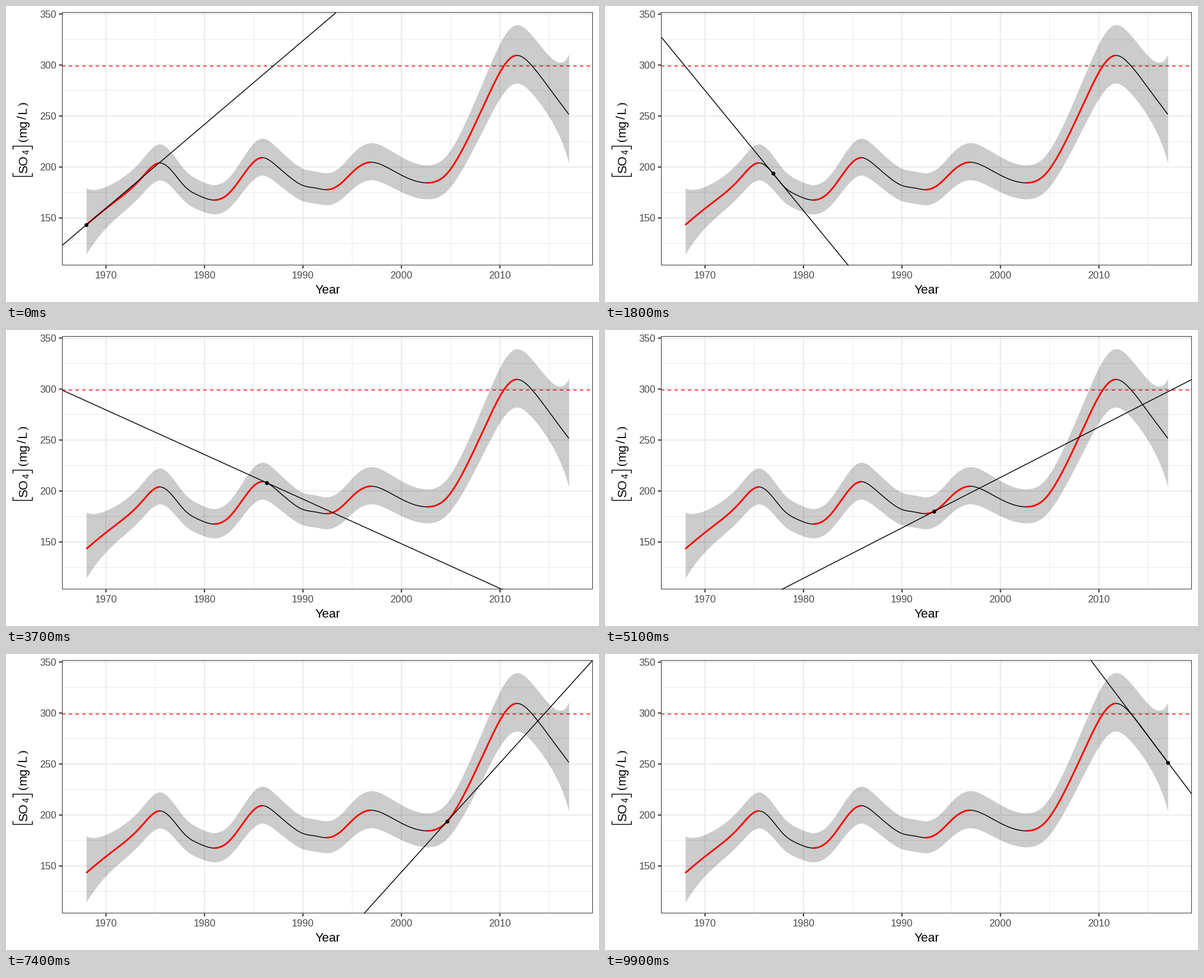
Recreate the animation shown at these times as a matplotlib script. Size 1058 by 529 pixels, loop 10 s.

```python
import numpy as np
import matplotlib.pyplot as plt
from matplotlib.animation import FuncAnimation

W, H, DPI = 1058, 529, 100
PX = 72 / DPI
LEFT, RIGHT, TOP, BOTTOM = 100, 1047, 11, 463.5
FIRST, LAST = 1968, 2017
FRAMES = 100
THIN, THICK, MAJOR, MINOR = 1.5, 3, 2.1, 1.07
SANS, SERIF = "Liberation Sans", "Liberation Serif"
GRID, INK, TICK = "#EBEBEB", "#4D4D4D", "#333333"

# Turning points and bends of the trend: year, concentration
KEYS = [
    (1968, 143.3), (1970, 159.3), (1972.5, 178.5), (1973.5, 188.1),
    (1975.5, 204), (1976.9, 193.7), (1978.07, 180.3), (1979.5, 171.7),
    (1981.03, 167.6), (1982.5, 174.4), (1984.2, 195.8), (1985.75, 209.1),
    (1987.2, 202.1), (1988.6, 190.6), (1990, 181.9), (1991.3, 179.4),
    (1992.5, 177.8), (1993.8, 183.5), (1995.1, 195.7), (1996.75, 204.6),
    (1998.3, 200.8), (2000, 192), (2002.55, 184.5), (2004.5, 192.3),
    (2005.95, 212.8), (2007.03, 233.1), (2009.06, 275), (2010.2, 296.2),
    (2011.53, 309.2), (2013.2, 299.9), (2015.05, 276.8), (2017, 251.6)]


def year_px(year):
    return 143.3 + (year - FIRST) * 17.57


def conc_px(value):
    return 14.4 + (350 - value) * 1.8225


class Spline:
    """Natural cubic spline through a few points."""

    def __init__(self, points):
        self.x, self.y = np.array(points, float).T
        n, h = len(points), np.diff(self.x)
        d = np.diff(self.y) / h
        a, b = np.eye(n), np.zeros(n)
        for i in range(1, n - 1):
            a[i, i - 1:i + 2] = h[i - 1], 2 * (h[i - 1] + h[i]), h[i]
            b[i] = 6 * (d[i] - d[i - 1])
        self.m, self.h, self.d = np.linalg.solve(a, b), h, d

    def __call__(self, t, slope=False):
        i = np.clip(np.searchsorted(self.x, t) - 1, 0, len(self.h) - 1)
        h, m0, m1 = self.h[i], self.m[i], self.m[i + 1]
        s = t - self.x[i]
        c1 = self.d[i] - h * (2 * m0 + m1) / 6
        c3 = (m1 - m0) / (6 * h)
        if slope:
            return c1 + m0 * s + 3 * c3 * s ** 2
        return self.y[i] + c1 * s + m0 * s ** 2 / 2 + c3 * s ** 3


def spread(year):
    """Half-width of the band on a log scale, flaring at both ends."""
    base = 0.083 + 0.01 * (year - FIRST) / (LAST - FIRST)
    return (base + 0.141 * np.exp((FIRST - year) / 1.7)
            + 0.118 * np.exp((year - LAST) / 0.97))


trend = Spline(KEYS)

fig = plt.figure(figsize=(W / DPI, H / DPI), dpi=DPI, facecolor="white")
page = fig.add_axes([0, 0, 1, 1])
page.set(xlim=(0, W), ylim=(H, 0))
page.axis("off")
panel = fig.add_axes([LEFT / W, 1 - BOTTOM / H,
                      (RIGHT - LEFT) / W, (BOTTOM - TOP) / H])
panel.set(xlim=(LEFT, RIGHT), ylim=(BOTTOM, TOP))
panel.axis("off")


def line(ax, x, y, width, color="black", z=5, **kw):
    kw.setdefault("solid_capstyle", "butt")
    return ax.plot(x, y, color=color, lw=width * PX, zorder=z,
                   snap=False, **kw)[0]


def label(x, y, text, size, color="black", font=SANS, **kw):
    page.text(x, y, text, fontsize=size * PX, color=color, family=font,
              va="baseline", **kw)


def draw_grid():
    for year in range(1970, 2020, 5):
        x, major = year_px(year), year % 10 == 0
        line(panel, [x, x], [TOP, BOTTOM], MAJOR if major else MINOR, GRID, 1)
        if major:
            line(page, [x, x], [BOTTOM, BOTTOM + 5.5], MAJOR, TICK)
            label(x, 486.8, str(year), 17.7, INK, ha="center")
    for value in range(125, 351, 25):
        y, major = conc_px(value), value % 50 == 0
        line(panel, [LEFT, RIGHT], [y, y], MAJOR if major else MINOR, GRID, 1)
        if major:
            line(page, [LEFT - 5.5, LEFT], [y, y], MAJOR, TICK)
            label(90, y + 6.2, str(value), 17.7, INK, ha="right")


def draw_titles():
    label((LEFT + RIGHT) / 2, 513.5, "Year", 22.1, ha="center")
    for x, y, text, size, font in [
            (38, 297.5, "SO", 22.1, SANS), (41.5, 265, "4", 15.5, SANS),
            (36.5, 242, "(", 22.1, SERIF), (36.5, 234.5, "mg", 22.1, SANS),
            (36.5, 201.5, "/", 22.1, SANS), (36.5, 193, "L", 22.1, SANS),
            (36.5, 179, ")", 22.1, SERIF)]:
        label(x, y, text, size, font=font, rotation=90, ha="left",
              rotation_mode="anchor")
    for y, hook in [(304.5, 298.5), (250.5, 256.5)]:
        line(page, [12.5, 12.5, 47, 47], [hook, y, y, hook], THIN,
             solid_joinstyle="miter")


def draw_curve():
    t = np.linspace(FIRST, LAST, 1200)
    value, w = trend(t), spread(t)
    x, y = year_px(t), conc_px(value)
    panel.fill_between(x, conc_px(value * np.exp(w)),
                       conc_px(value * np.exp(-w)),
                       color="black", alpha=0.2, lw=0, zorder=3)
    line(panel, x, y, THIN, z=4)
    rising = trend(t, slope=True) > 0
    line(panel, x, np.where(rising, y, np.nan), THICK, "red", 5)


def draw_frame():
    l, r, t, b = LEFT + 0.5, RIGHT - 0.5, TOP + 0.5, BOTTOM - 0.5
    line(page, [l, r, r, l, l], [t, t, b, b, t], MINOR, TICK,
         solid_capstyle="projecting", solid_joinstyle="miter")


draw_grid()
draw_titles()
limit = conc_px(299)
line(panel, [LEFT, RIGHT], [limit, limit], THIN, "red", 2,
     linestyle=(0, (4, 4)), dash_capstyle="butt")
draw_curve()
page.set_zorder(2)
page.patch.set_visible(False)
draw_frame()

tangent = line(panel, [], [], THIN, z=6)
dot = panel.plot([], [], "o", color="black", ms=7 * PX, mew=0, zorder=7)[0]


def update(i):
    year = FIRST + (LAST - FIRST) * i / (FRAMES - 1)
    value, rate = trend(year), trend(year, slope=True)
    ends = np.array([FIRST - 5, LAST + 5])
    tangent.set_data(year_px(ends), conc_px(value + rate * (ends - year)))
    dot.set_data([year_px(year)], [conc_px(value)])
    return tangent, dot


anim = FuncAnimation(fig, update, frames=FRAMES, interval=100,
                     repeat=True, repeat_delay=0)
plt.show()
```
